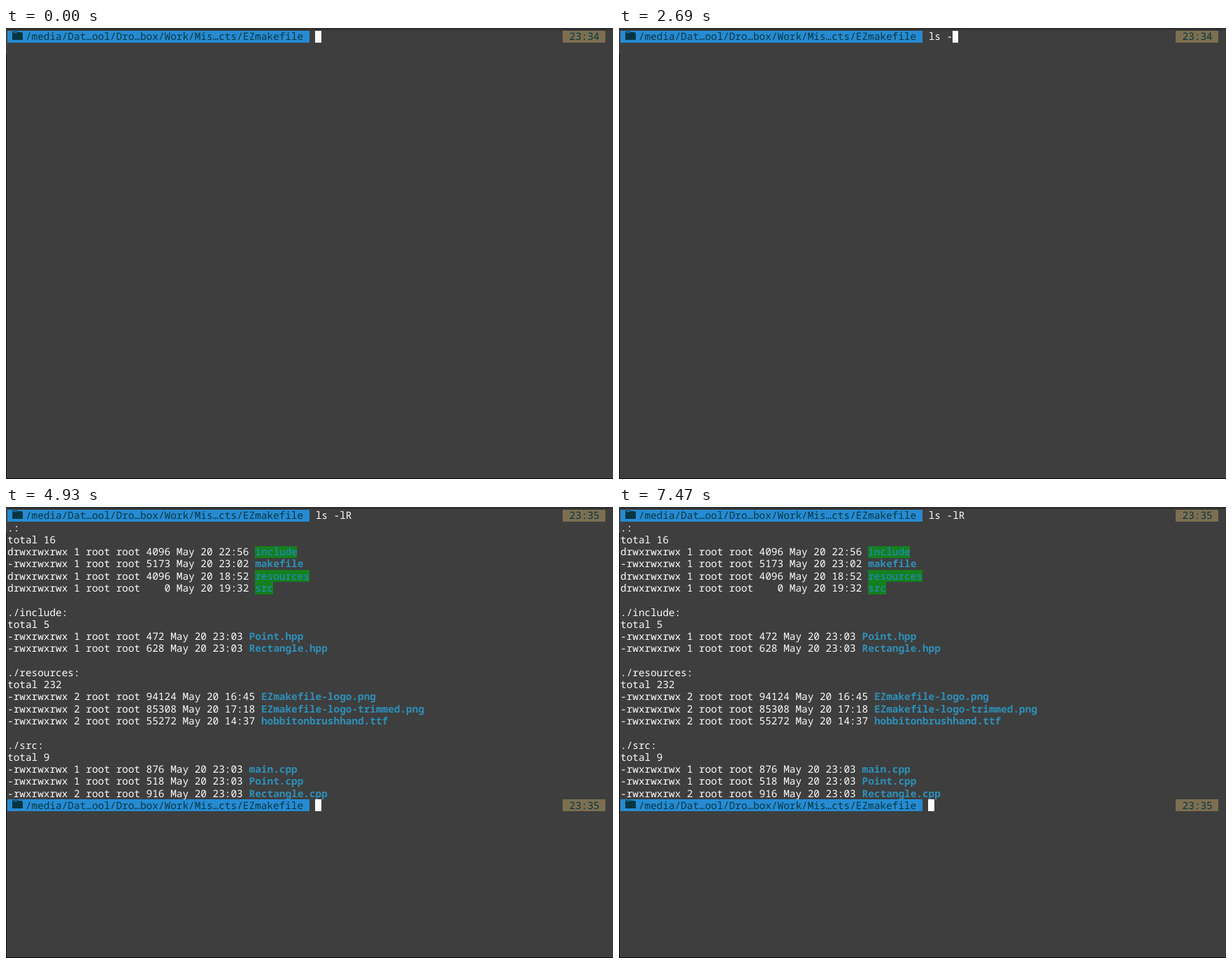
Recreate the animation shown at these times as an HTML page with a canvas. Size 868 by 645 pixels, loop 8 s.

```html
<!DOCTYPE html>
<html lang="en">
<head>
<meta charset="utf-8">
<title>Terminal</title>
<style>
  html, body { margin: 0; width: 100%; height: 100%; overflow: hidden; background: #3e3e3e; }
  canvas { display: block; }
</style>
</head>
<body>
<canvas id="stage" width="868" height="645"></canvas>
<script>
const ctx = document.getElementById('stage').getContext('2d');

const LOOP = 8000, OUTPUT_AT = 4930;
const CELL_W = 8.64, CELL_H = 17.27, LEFT = 2, TOP = 3.7, BASELINE = 13.7;
const FONT = '14.4px "Noto Sans Mono", monospace';
const COLOR = {
  back: '#3e3e3e', strip: '#303030', edge: '#0c0c0c', text: '#fcfcfc',
  path: '#268bd2', ink: '#073642', clock: '#7c6f50', file: '#2e90b8', dirBack: '#14801e'
};
const PATH = '/media/Dat…ool/Dro…box/Work/Mis…cts/EZmakefile';
const COMMAND = 'ls -lR';
const KEY_TIMES = [1500, 1950, 2390, 2690, 3580, 4180];
const CURSOR_OFF = [[450, 1200], [3290, 3580], [5530, 6120], [6870, 7470]];
const PROMPT_COL = 51;

// '#' marks a directory name, '*' an executable file
const LISTING = `.:
total 16
drwxrwxrwx 1 root root 4096 May 20 22:56 #include
-rwxrwxrwx 1 root root 5173 May 20 23:02 *makefile
drwxrwxrwx 1 root root 4096 May 20 18:52 #resources
drwxrwxrwx 1 root root    0 May 20 19:32 #src

./include:
total 5
-rwxrwxrwx 1 root root 472 May 20 23:03 *Point.hpp
-rwxrwxrwx 1 root root 628 May 20 23:03 *Rectangle.hpp

./resources:
total 232
-rwxrwxrwx 2 root root 94124 May 20 16:45 *EZmakefile-logo.png
-rwxrwxrwx 2 root root 85308 May 20 17:18 *EZmakefile-logo-trimmed.png
-rwxrwxrwx 2 root root 55272 May 20 14:37 *hobbitonbrushhand.ttf

./src:
total 9
-rwxrwxrwx 1 root root 876 May 20 23:03 *main.cpp
-rwxrwxrwx 1 root root 518 May 20 23:03 *Point.cpp
-rwxrwxrwx 2 root root 916 May 20 23:03 *Rectangle.cpp`.split('\n');

const colX = col => LEFT + col * CELL_W;
const rowY = row => TOP + row * CELL_H;

function rect(x, y, w, h, color) {
  ctx.fillStyle = color;
  ctx.fillRect(x, y, w, h);
}

function cells(col, row, count, color) {
  const x = Math.floor(colX(col)), y = Math.round(rowY(row));
  rect(x, y, Math.floor(colX(col + count)) - x, Math.round(rowY(row + 1)) - y, color);
}

function write(text, col, row, color = COLOR.text, bold = false) {
  ctx.font = (bold ? 'bold ' : '') + FONT;
  ctx.fillStyle = color;
  ctx.fillText(text, colX(col), rowY(row) + BASELINE);
}

function folder(row) {
  const y = Math.round(rowY(row));
  rect(9, y + 1, 8, 1, COLOR.ink);
  rect(9, y + 3, 15, 10, COLOR.ink);
  rect(9, y + 2, 1, 1, COLOR.ink);
  rect(16, y + 2, 7, 1, COLOR.ink);
}

function prompt(row, time) {
  cells(0, row, 50, COLOR.path);
  folder(row);
  write(PATH, 3, row, COLOR.ink);
  cells(92, row, 7, COLOR.clock);
  write(time, 93, row, COLOR.ink);
}

function listing() {
  LISTING.forEach((line, i) => {
    const row = i + 1, col = line.search(/[#*]/);
    if (col < 0) return write(line, 0, row);
    const name = line.slice(col + 1), isDir = line[col] === '#';
    write(line.slice(0, col), 0, row);
    if (isDir) cells(col, row, name.length, COLOR.dirBack);
    write(name, col, row, isDir ? COLOR.path : COLOR.file, !isDir);
  });
}

function draw(t) {
  const done = t >= OUTPUT_AT;
  const typed = KEY_TIMES.filter(k => t >= k).length;
  const clock = done ? '23:35' : '23:34';
  const lastRow = LISTING.length + 1;

  rect(0, 0, 868, 645, COLOR.back);
  rect(0, 0, 868, 3, COLOR.strip);
  rect(0, 37, 1, 608, COLOR.edge);
  rect(0, 644, 868, 1, COLOR.edge);

  prompt(0, clock);
  write(COMMAND.slice(0, typed), PROMPT_COL, 0);
  if (done) {
    listing();
    prompt(lastRow, clock);
  }
  if (!CURSOR_OFF.some(([from, to]) => t >= from && t < to)) {
    cells(PROMPT_COL + (done ? 0 : typed), done ? lastRow : 0, 1, COLOR.text);
  }
}

ctx.textRendering = 'geometricPrecision';
const start = performance.now();
function tick() {
  draw((performance.now() - start) % LOOP);
  requestAnimationFrame(tick);
}
tick();
</script>
</body>
</html>
```
